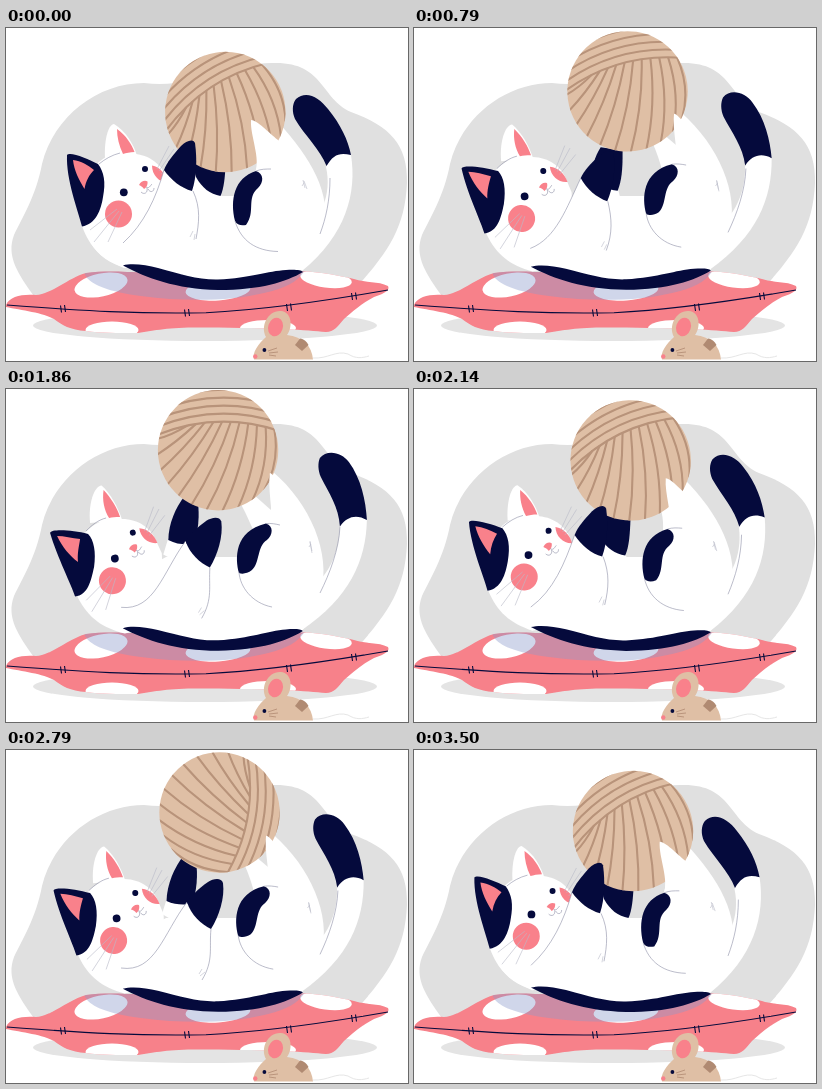
Animation of 402 by 333 pixels, one loop 3570 ms. Source, as an HTML page:

```html
<!DOCTYPE html>
<html lang="en">
<head>
<meta charset="utf-8">
<title>Cat with yarn</title>
<style>
html, body { margin: 0; width: 100%; height: 100%; overflow: hidden; background: #fff; }
svg { display: block; width: 402px; height: 333px; }
.ink { fill: #050a3c; }
.fur { fill: #fff; }
.pink { fill: #f9818b; }
.wool { fill: #dfbfa5; }
.hair { fill: none; stroke: #8d8fa6; stroke-width: .6; }
.tuft { fill: none; stroke: #b9bac8; stroke-width: .6; }
.seam { fill: none; stroke: #050a3c; stroke-width: 1.1; }
.strand { fill: none; stroke: #b8937a; stroke-width: 2.1; }
</style>
</head>
<body>
<svg viewBox="0 0 402 333">
  <defs>
    <clipPath id="disc"><circle r="60.2"/></clipPath>
    <clipPath id="cushion"><path id="cushionShape" d="M0 277C4 268 16 266 30 267C46 266 62 250 80 245C110 241 130 246 200 246C260 246 280 243 298 243.500C315 244 335 248 348 251C360 255 372 253 382 258C384 262 380 265 368 269C356 275 346 284 338 291C332 298 328 304 320 304C300 302 270 300 200 299.500C165 299 150 302 132 305C110 305 95 305 80 303C64 302 56 297 48 291C38 285 15 282 0 279Z"/></clipPath>
  </defs>

  <path fill="#e0e0e0" d="M28 268C12 246 0 228 8 207C16 190 30 168 36 136C48 88 92 55 138 55C190 61 222 35 266 35C318 33 314 70 345 84C384 98 402 117 401 155C399 198 384 222 350 260Z"/>
  <ellipse cx="199" cy="297.500" rx="172" ry="15.500" fill="#e4e4e4"/>
  <use href="#cushionShape" fill="#f7818a"/>
  <g clip-path="url(#cushion)">
    <g class="fur">
      <ellipse cx="95" cy="257" rx="27" ry="11.500" transform="rotate(-12 95 257)"/>
      <ellipse cx="106" cy="302" rx="26.500" ry="8.500"/>
      <ellipse cx="212" cy="262" rx="32.500" ry="10.500" transform="rotate(-4 212 262)"/>
      <ellipse cx="262" cy="300" rx="28" ry="8"/>
      <ellipse cx="320" cy="251" rx="26" ry="8.500" transform="rotate(8 320 251)"/>
    </g>
    <path fill="#8998ca" opacity=".4" d="M78 240C76 256 104 264 135 268C180 274 225 273 258 265C280 260 294 253 300 240Z"/>
  </g>
  <path class="seam" d="M1 277C80 283 130 286 200 284.700C265 281.500 325 272 382 262"/>
  <g id="stitches" class="seam"></g>

  <path class="fur" d="M85 215C92 228 105 236 118 239L160 248L210 256L270 250L296 242L322 200L300 168H160L120 190Z"/>
  <g id="rump"></g>

  <g id="head">
    <path class="fur" d="M85 142C92 134 98 128 112 125L130 126C146 128 158 139 161 152L165 165L160 235L118 240C96 231 84 220 76 198Z"/>
    <circle class="pink" cx="112.500" cy="186" r="13.500"/>
    <path class="pink" d="M146 137.500C154 139 160 146 162 154.500C153 154.500 146 147 146 137.500Z"/>
    <circle class="ink" cx="117.800" cy="164.300" r="3.900"/>
    <circle class="ink" cx="139" cy="141" r="3"/>
    <path class="pink" d="M133 157C135 153 139 152 141.500 153.500C142 157 140 160 138 161C137 159 135 158 133 157Z"/>
    <path class="hair" d="M140 159C143 161 144 158 146 156M141 160C142 165 138 167 135 164M142 161C144 165 148 164 148 160"/>
    <path class="tuft" d="M111 181L84 202M113 183L88 214M116 184L102 214M151 141L163 118M153 143L168 121M155 146L173 128"/>
  </g>
  <g id="ears"></g>
  <path id="belly" class="ink" d="M117 237.500C126 235 140 237 152 240C175 246 192 252 212 251.500C245 250 262 243 280 242C290 241.500 295 242 297 244C280 254 255 262 212 262C170 261 140 250 117 237.500Z"/>

  <g id="backArm"></g>
  <g id="ball">
    <circle class="wool" r="60.200"/>
    <g id="strands" class="strand" clip-path="url(#disc)"></g>
  </g>
  <g id="arm"></g>
  <g id="feet"></g>

  <path class="wool" d="M248 331.500C246 325 252 316 260 309C254 298 262 282 275 283C286 284 287 299 281 307C297 309 306 318 307 331.500Z"/>
  <ellipse class="pink" cx="269.500" cy="299" rx="7.300" ry="9.500" transform="rotate(18 269.500 299)"/>
  <path fill="#b08a72" d="M289 317L294 310.500C298 311 301 314 302.500 317L296 323Z"/>
  <circle class="ink" cx="258.400" cy="322" r="1.900"/>
  <circle class="pink" cx="249.300" cy="328.500" r="2.200"/>
  <path fill="none" stroke="#b08a72" stroke-width=".8" d="M262 323L271 320M263 325L272 324M263 327L270 328"/>
  <path fill="none" stroke="#e6e6e6" d="M307 330C322 331 330 322 342 326C350 331 356 330 363 328"/>
</svg>
<script>
const $ = id => document.getElementById(id);
const add = (parent, cls, d) => {
  const p = document.createElementNS('http://www.w3.org/2000/svg', 'path');
  p.setAttribute('class', cls);
  if (d) p.setAttribute('d', d);
  return $(parent).appendChild(p);
};
const lerp = (a, b, w) => a + (b - a) * w;

// Shapes that blend between a resting and a reaching pose
const morphs = [];
function morph(parent, cls, drive, from, to) {
  const target = to.match(/-?[\d.]+/g).map(Number);
  morphs.push({ el: add(parent, cls), drive, from, target });
}
function blend(m, w) {
  let i = 0;
  m.el.setAttribute('d', m.from.replace(/-?[\d.]+/g, n => lerp(+n, m.target[i++], w).toFixed(2)));
}

// tail and thigh
morph('rump', 'fur', 'sway',
  'M320 139C328 124 336 122 345 127C351 165 340 207 296 243L290 205C316 195 326 165 320 139Z',
  'M334 138C342 123 350 122 361 131C360 172 344 208 296 241L294 204C318 196 333 169 334 138Z');
morph('rump', 'ink', 'sway',
  'M290 71C300 62 313 69 322 81C335 97 342 112 345 127C333 124 327 127 320.5 138C314 121 299 108 289 91C286 84 286 76 290 71Z',
  'M314 69C321 60 336 63 343 73C355 89 360 112 361 131C351 125 341 127 334 137.5C333 118 323 104 315 88C312 81 312 74 314 69Z');
morph('rump', 'fur', 'sway',
  'M246 100C252 115 254 130 250 143L228 190C235 215 250 223 272 223L318 205C326 165 305 130 272 94L258 108L250 104Z',
  'M233 112C238 120 243 132 247 140L233 182C235 195 245 212 265 218L315 203C325 165 305 115 266 82L265 121L248 106Z');
morph('rump', 'hair', 'sway',
  'M324 150C324 172 320 190 314 206',
  'M334 138C333 160 324 184 314 204');
morph('rump', 'tuft', 'sway',
  'M297 152L299 160M296 158L298 155M298 153L301 161',
  'M304 152L306 162M303 158L305 155M304 153L306 164');

// ears and face patch
morph('ears', 'fur', 'sway',
  'M99 130C98 110 103 96 108 96C120 103 128 117 131 128Z',
  'M84 134C82 115 88 97 95.5 96.5C104 104 112 118 116 131Z');
morph('ears', 'pink', 'sway',
  'M111 101C120 107 126 117 128.5 124C124 124 120 125 117 126C113 118 111 109 111 101Z',
  'M97.5 101C105 109 111 119 114 128C109 128 106 128 103 129C98 121 96 111 97.5 101Z');
morph('ears', 'hair', 'sway',
  'M93 136C99 131 106 127 114 125',
  'M80 142C86 136 92 131 100 129');
morph('ears', 'ink', 'sway',
  'M61 127C64 123 82 131 92 136C98 144 100 154 97 169C95 182 90 196 76 198.5C72 182 60 152 61 127Z',
  'M44 144C45 140 66 141 82 145C88 151 90 163 88 178C85 192 82 206 69 207.5C66 197 51 168 44 144Z');
morph('ears', 'pink', 'sway',
  'M67 132C75 133 82 137 88 142C83 147 80 153 78.5 161C73 152 68 142 67 132Z',
  'M51 147C58 147 66 149 74 150C73 157 71 165 72 173C64 167 56 158 51 147Z');

// far arm
morph('backArm', 'fur', 'reach',
  'M188 146L215 165L218 190L178 190Z',
  'M161 148L185 150L200 190L156 164Z');
morph('backArm', 'ink', 'reach',
  'M192 128C188 136 188 143 190 149C196 160 204 166 214.5 168C218 160 219 150 220 130Z',
  'M178 105C168 118 161 134 160.5 151C169 155 177 155 186 154C191 140 192 126 190 110Z');

// near arm
morph('arm', 'fur', 'reach',
  'M158 142C165 152 175 160 186 163C195 180 193 198 188 215L118 216C140 195 150 168 158 142Z',
  'M181 152C185 165 195 174 205 179C204 200 206 214 196 230L116 219C150 222 160 182 181 152Z');
morph('arm', 'hair', 'reach',
  'M117 215C138 196 150 170 158 142M187 163C195 180 193 195 190 211',
  'M115 218C149 223 157 184 181 152M205 179C203 198 208 210 196 230');
morph('arm', 'tuft', 'reach',
  'M184 209L187 203M188 212L189 206',
  'M193 224L196 219M194 226L199 222');
morph('arm', 'ink', 'reach',
  'M189 115C187 110 180 113 175 118C167 127 161 134 158 142C165 152 175 160 186 163C191 148 191 130 189 115Z',
  'M217 133C215 127 207 129 202 132C192 139 185 146 181 152C185 165 195 174 205 179C213 166 219 148 217 133Z');

// hind feet
morph('feet', 'fur', 'sway',
  'M245 92C251 92 262 104 272 112L290 150L262 160L249 145C255 130 244 108 245 92Z',
  'M264 84C266 84 268 88 270 90L290 140L272 150L266 136C266 116 262 100 264 84Z');
morph('feet', 'ink', 'sway',
  'M250 143C258 146 258 154 252 160C240 170 250 184 240 197C235 198 231 197 229 193C224 172 228 150 250 143Z',
  'M260 134.5C268 137 267 146 261 151C251 157 254 174 246 181C241 185 236 185 233 184C229 170 228 142 260 134.5Z');
morph('feet', 'hair', 'sway',
  'M229 193C235 213 250 223 272 223.5M250 143C255 141 260 141 265 141',
  'M233 183C234 198 246 214 266 218M260 134.5C265 134 270 135 274 136');

// yarn: bowed bands on top, a fan below that starts on the lowest band
for (let i = 0; i < 5; i++) {
  const y = -8 * i;
  add('strands', 'strand', `M-62 ${y - 15}Q0 ${y - 40} 62 ${y - 19}`);
}
function bandY(x) {
  const t = (x + 62) / 124, s = 1 - t;
  return -15 * s * s - 80 * s * t - 19 * t * t;
}
for (let i = -1; i < 10; i++) {
  const a = (176 - 15 * i) * Math.PI / 180;
  const sx = -22 + 8.7 * i, sy = bandY(sx);
  const ex = 61 * Math.cos(a), ey = 61 * Math.sin(a);
  add('strands', 'strand', `M${sx} ${sy}Q${(sx + ex) / 2 + i * 1.2} ${(sy + ey) / 2 + 3} ${ex} ${ey}`);
}
for (const [x, y] of [[57, 281], [181, 285], [283, 279.5], [348, 268.5]])
  add('stitches', 'seam', `M${x - 2.5} ${y - 3.5}l1 7m3 -7.5l1 7`);

// One toss: step, ball height, arm reach, ball turn
const FRAME = 71.4, FRAMES = 50, TOSS = FRAMES / 3;
const keys = [
  [0, 84, 0, -32],
  [1.5, 73, .27, -47],
  [5.67, 62.5, 1, -258],
  [8, 60.7, 1, -333],
  [9.33, 61.2, .94, -360],
  [11, 63.4, .38, -374],
  [15.67, 81, 0, -391],
  [TOSS, 84, 0, -392]
];
const secant = (k, c) => (keys[k + 1][c] - keys[k][c]) / (keys[k + 1][0] - keys[k][0]);
function slope(k, c) {
  if (k === 0) return secant(0, c);
  if (k === keys.length - 1) return secant(k - 1, c);
  const a = secant(k - 1, c), b = secant(k, c);
  return a * b > 0 ? 2 * a * b / (a + b) : 0;
}
function track(p, c) {
  let k = 0;
  while (k < keys.length - 2 && p >= keys[k + 1][0]) k++;
  const h = keys[k + 1][0] - keys[k][0], u = (p - keys[k][0]) / h, v = 1 - u;
  return v * v * ((1 + 2 * u) * keys[k][c] + u * h * slope(k, c))
    + u * u * ((3 - 2 * u) * keys[k + 1][c] - v * h * slope(k + 1, c));
}

const place = (id, transform) => $(id).setAttribute('transform', transform);

function draw(step) {
  const p = step % TOSS;
  const sway = (1 - Math.cos(2 * Math.PI * p / TOSS)) / 2;
  const pose = { sway: sway * 1.03, reach: track(p, 2) };
  for (const m of morphs) blend(m, pose[m.drive]);
  place('head', `rotate(${-7.8 * sway} 153 235)`);
  place('belly', `rotate(${-1.2 * sway} 200 250)`);
  place('arm', `translate(0 ${9 * sway * (1 - pose.reach)})`);
  place('ball', `translate(${219.3 - 7.5 * sway} ${track(p, 1)}) rotate(${track(p, 3)})`);
}

const start = performance.now();
function tick() {
  const t = performance.now() - start;
  draw(Math.floor((t + 3) / FRAME) % FRAMES);
  requestAnimationFrame(tick);
}
tick();
</script>
</body>
</html>
```
